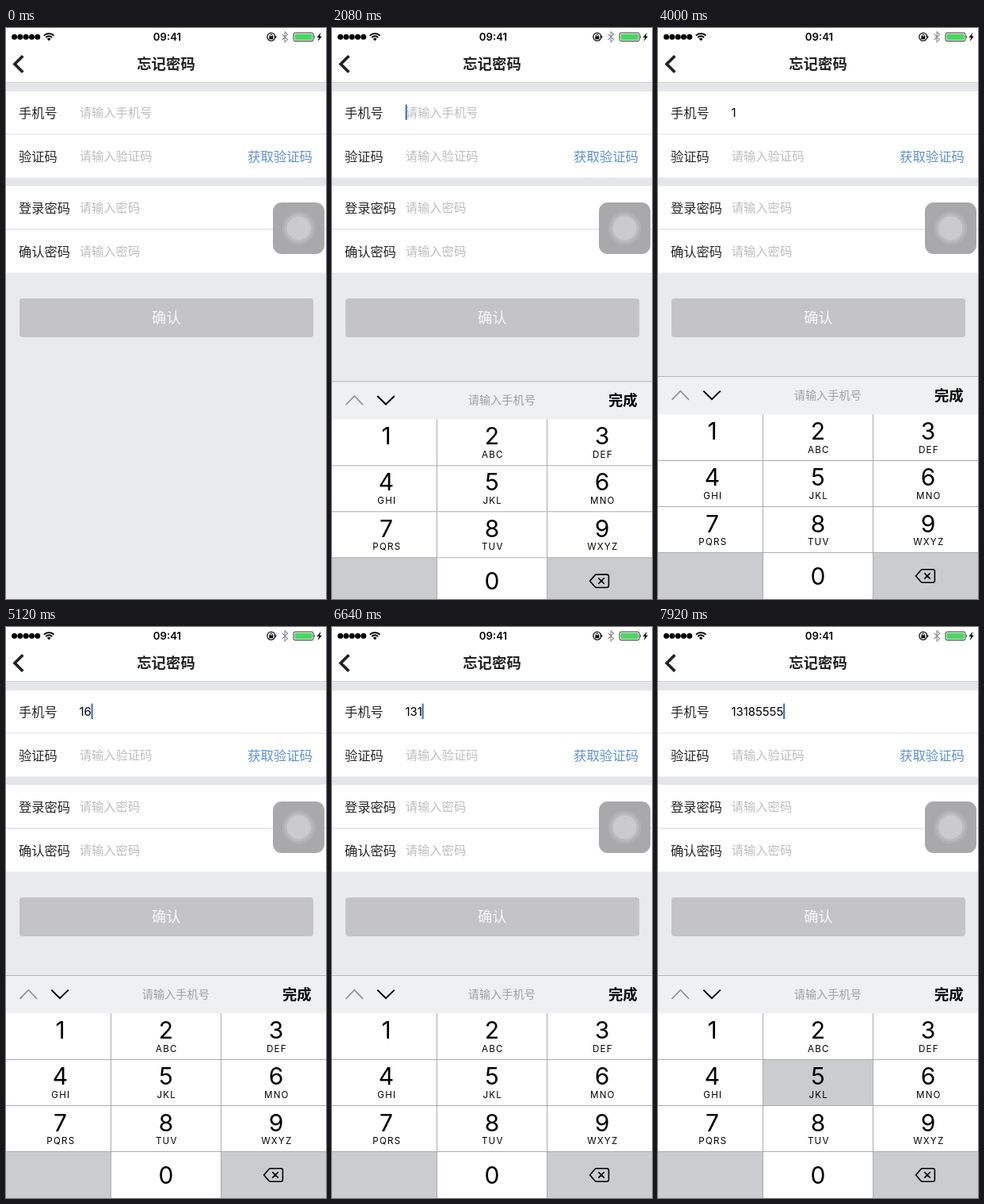
An HTML page for the animation above (8 s loop, 404x720 px).

```html
<!DOCTYPE html>
<html lang="zh-CN">
<head>
<meta charset="utf-8">
<style>
html, body { margin: 0; width: 100%; height: 100%; overflow: hidden; background: #e9eaec; }
svg { display: block; width: 404px; height: 720px; }
text { font-family: Inter, "Noto Sans CJK SC", "Noto Sans CJK", sans-serif; }
.label { font-size: 16.3px; fill: #262626; }
.hint { font-size: 15.3px; fill: #bdbdc1; }
.mid { text-anchor: middle; }
.num { font-size: 30px; text-anchor: middle; }
.abc { font-size: 11.6px; letter-spacing: 1.2px; text-anchor: middle; }
.line { fill: none; stroke-linecap: butt; stroke-linejoin: miter; }
</style>
</head>
<body>
<svg id="stage" viewBox="0 0 404 720">
  <rect width="404" height="720" fill="#e9eaec"/>
  <rect width="404" height="68" fill="#fff"/>
  <rect y="68" width="404" height="1" fill="#cdced1"/>
  <rect y="69" width="404" height="11" fill="#e5e6e9"/>
  <rect y="188" width="404" height="11" fill="#e5e6e9"/>

  <g id="dots"></g>
  <g class="line" stroke="#000" stroke-width="2">
    <path d="M47.9 9.6a8.7 8.7 0 0 1 12.6 0M50.3 12a5.3 5.3 0 0 1 7.8 0"/>
  </g>
  <path d="M54.2 16.2l-2.3-2.5a3.3 3.3 0 0 1 4.6 0z"/>
  <text class="mid" x="203.5" y="15.7" font-size="13.2" font-weight="600">09:41</text>
  <circle class="line" cx="334.8" cy="11.2" r="5" stroke="#111" stroke-width="1.3"/>
  <path d="M338 10.4h4l-2 2.7z"/>
  <rect x="332.3" y="10.4" width="5" height="3.8"/>
  <path class="line" d="M333.3 10.6v-1a1.5 1.5 0 0 1 3 0v1" stroke="#000"/>
  <path class="line" d="M348.5 7.6l7 7-3.5 3.2v-13l3.5 3.2-7 7" stroke="#8b8b8f" stroke-width="1.1"/>
  <rect x="363" y="6" width="25" height="10.6" rx="2" fill="#fff" stroke="#333"/>
  <rect x="364.4" y="7.4" width="22.2" height="7.8" rx=".8" fill="#4cd663"/>
  <path d="M389.2 9.3q2 2 0 4z" fill="#333"/>
  <path d="M397.6 5.6l-5.2 6.4h2.8l-1.7 5 5.4-6.6H396z"/>

  <path class="line" d="M21.3 35.2L11 45.5l10.3 10.3" stroke="#222" stroke-width="3.7"/>
  <text class="mid" x="202" y="52" font-size="18.4" font-weight="700" fill="#222">忘记密码</text>

  <g id="form"></g>
  <text x="305" y="168" font-size="16.4" fill="#5d8fd1">获取验证码</text>
  <text id="entry" x="92.4" y="112" font-size="14.9"></text>
  <rect id="caret" y="96.5" width="2.2" height="19.5" fill="#4173ca"/>

  <rect x="17" y="341" width="371" height="49" rx="4" fill="#c4c4c6"/>
  <text class="mid" x="202.3" y="372.3" font-size="18.4" fill="#f8f8f8">确认</text>

  <rect x="337" y="220" width="65" height="65" rx="11" fill="#a9a9ab"/>
  <g id="knob"></g>

  <g id="board">
    <rect width="404" height="281" fill="#fff"/>
    <rect width="404" height="48" fill="#eff0f1"/>
    <rect width="404" height="1" fill="#b4b6ba"/>
    <path class="line" d="M17.5 29.8L28.3 18.6l10.8 11.2" stroke="#919194" stroke-width="1.7"/>
    <path class="line" d="M57.3 18.6L68 29.2l10.8-10.6" stroke="#000" stroke-width="2"/>
    <text class="mid" x="214.3" y="29" font-size="14.2" fill="#a0a0a3">请输入手机号</text>
    <text x="349" y="31" font-size="18.3" font-weight="700">完成</text>
    <g id="keys"></g>
  </g>
</svg>
<script>
const NS = "http://www.w3.org/2000/svg";
const $ = id => document.getElementById(id);

function add(parent, tag, attrs, text) {
  const el = document.createElementNS(NS, tag);
  for (const k in attrs) el.setAttribute(k, attrs[k]);
  if (text) el.textContent = text;
  parent.appendChild(el);
  return el;
}

for (let i = 0; i < 5; i++) add($("dots"), "circle", { cx: 10.6 + i * 7.3, cy: 11.2, r: 3.5 });
[[21, "#b1b1b3"], [18, "#bbbbbd"], [15, "#cbcbcd"]]
  .forEach(([r, fill]) => add($("knob"), "circle", { cx: 369.5, cy: 252.5, r, fill }));

const form = $("form");
const rows = [
  [80, "手机号", "请输入手机号"], [134, "验证码", "请输入验证码"],
  [199, "登录密码", "请输入密码"], [254, "确认密码", "请输入密码"]
];
const hints = rows.map(([y, label, hint], i) => {
  const base = [113, 168, 233, 288][i];
  add(form, "rect", { y, width: 404, height: 54.5, fill: "#fff" });
  if (i % 2) add(form, "rect", { y: y - 0.5, width: 404, height: 1, fill: "#dcdde0" });
  add(form, "text", { class: "label", x: 16, y: base }, label);
  return add(form, "text", { class: "hint", x: 92.7, y: base - 1 }, hint);
});

// Keypad
const GREY = "#cbccd0";
const letters = ["", "ABC", "DEF", "GHI", "JKL", "MNO", "PQRS", "TUV", "WXYZ"];
const colX = [0, 132, 271, 404], rowY = [48, 106, 164.5, 222.5, 281], mid = [68.5, 202, 341];
const names = [..."123456789", "", "0", "del"];
const keys = {};
names.forEach((name, i) => {
  const c = i % 3, r = Math.floor(i / 3), y = rowY[r];
  const pad = add($("keys"), "rect", {
    x: colX[c], y, width: colX[c + 1] - colX[c], height: rowY[r + 1] - y,
    fill: r === 3 && c !== 1 ? GREY : "#fff"
  });
  if (name) keys[name] = pad;
  if (name.length !== 1) return;
  add($("keys"), "text", { class: "num", x: mid[c], y: y + (r === 3 ? 40.3 : 32) }, name);
  if (letters[i]) add($("keys"), "text", { class: "abc", x: mid[c] + 0.8, y: y + 48.5 }, letters[i]);
});
const rule = { class: "line", stroke: "#a9abb0", "stroke-width": 1 };
add($("keys"), "path", { ...rule, d: "M0 106.5H404M0 164.5H404M0 222.5H404M132.5 48V281M271.5 48V281" });
add($("keys"), "path", {
  class: "line", stroke: "#000", "stroke-width": 1.6,
  d: "M325.6 252l6.2-7.2q.9-1 2.1-1H347q2.4 0 2.4 2.4v11.6q0 2.4-2.4 2.4h-13.1q-1.2 0-2.1-1zM336.3 248.2l7.4 7.4M343.7 248.2l-7.4 7.4"
});

// Key presses: [time, key]
const taps = [
  [3120, "1"], [4800, "6"], [5440, "del"], [6000, "3"], [6400, "1"], [6720, "8"],
  [6880, "5"], [7040, "5"], [7440, "5"], [7840, "5"]
];
const LOOP = 8000, STEP = 80, HOLD = 160, OPEN = 1768, RATE = 0.01826, BLINK = 500;

function draw(now) {
  const t = Math.floor((now % LOOP) / STEP) * STEP;

  // Critically damped spring lifts the keyboard
  const s = Math.max(0, t - OPEN) * RATE;
  const up = t > OPEN + 520 ? 1 : 1 - (1 + s) * Math.exp(-s);
  $("board").setAttribute("transform", `translate(0 ${720 - 281 * up})`);

  let value = "", last = OPEN, held = null;
  for (const [at, key] of taps) {
    if (t < at) break;
    value = key === "del" ? value.slice(0, -1) : value + key;
    last = at;
    held = t < at + HOLD ? key : null;
  }
  for (const k in keys) {
    const on = k === held;
    keys[k].setAttribute("fill", (k === "del") !== on ? GREY : "#fff");
  }

  const entry = $("entry");
  entry.textContent = value;
  hints[0].style.display = value ? "none" : "";
  const width = value ? entry.getComputedTextLength() : 0;
  $("caret").setAttribute("x", 92.6 + Math.max(0, width - 0.4));
  const lit = t >= OPEN && Math.floor((t - last) / BLINK) % 2 === 0;
  $("caret").style.display = lit ? "" : "none";
}

const start = performance.now();
function tick() {
  draw(performance.now() - start);
  requestAnimationFrame(tick);
}
tick();
</script>
</body>
</html>
```
